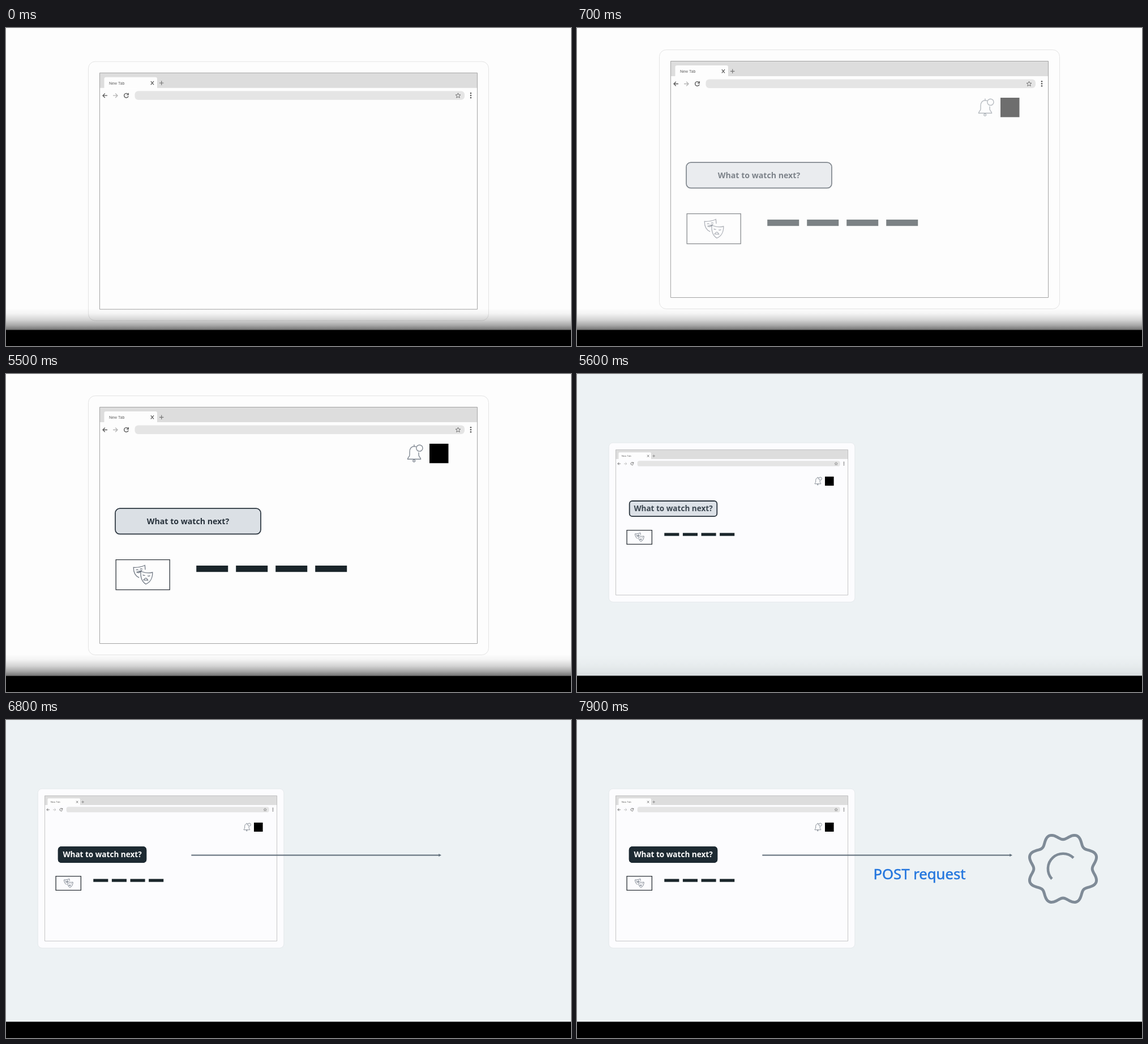
Animation of 998 by 561 pixels, one loop 8000 ms. Source, as an HTML page with a canvas:

```html
<!DOCTYPE html>
<html lang="en">
<head>
<meta charset="utf-8">
<title>Request flow</title>
<style>
  html, body { margin: 0; width: 100%; height: 100%; overflow: hidden; background: #000; }
  canvas { display: block; }
</style>
</head>
<body>
<canvas id="stage" width="998" height="561"></canvas>
<script>
const ctx = document.getElementById('stage').getContext('2d');
const LOOP = 8000, STEP = 100;
const SANS = '"Noto Sans", "Open Sans", sans-serif';
let now = 0;

// Fade progress: starts faintly at `start` and is complete 400 ms later.
const fade = start => now < start ? 0 : Math.min(1, 0.13 + 0.87 * (now - start) / 400);

function rect(x, y, w, h, fill) {
  ctx.fillStyle = fill;
  ctx.fillRect(x, y, w, h);
}

function box(x, y, w, h, r, fill, stroke, lw = 1) {
  ctx.beginPath();
  ctx.roundRect(x, y, w, h, r);
  if (fill) { ctx.fillStyle = fill; ctx.fill(); }
  if (stroke) { ctx.strokeStyle = stroke; ctx.lineWidth = lw; ctx.stroke(); }
}

function line(d, color, lw) {
  ctx.strokeStyle = color;
  ctx.lineWidth = lw;
  ctx.stroke(new Path2D(d));
}

function dot(x, y, r, color) {
  ctx.beginPath();
  ctx.arc(x, y, r, 0, 7);
  ctx.fillStyle = color;
  ctx.fill();
}

function text(str, x, y, font, color, align) {
  ctx.font = font;
  ctx.textAlign = align;
  ctx.fillStyle = color;
  ctx.fillText(str, x, y);
}

function group(x, y, scale, alpha, draw) {
  ctx.save();
  ctx.translate(x, y);
  ctx.scale(scale, scale);
  ctx.globalAlpha *= alpha;
  draw();
  ctx.restore();
}

function star(x, y, r) {
  ctx.beginPath();
  for (let i = 0; i < 10; i++) {
    const a = i * Math.PI / 5, d = i % 2 ? r * 0.45 : r;
    ctx.lineTo(x + d * Math.sin(a), y - d * Math.cos(a));
  }
  ctx.closePath();
  ctx.strokeStyle = '#707070';
  ctx.lineWidth = 1;
  ctx.stroke();
}

function browser(edge, page) {
  box(145.5, 38.5, 707, 457, 12, page, edge);
  rect(165.5, 58.5, 667, 26.5, '#dddddd');
  box(173.5, 66, 93.5, 19.5, [3, 3, 0, 0], '#fdfdfd');
  text('New Tab', 182, 79, '7.1px Roboto, sans-serif', '#666', 'left');
  line('M255.8 73.2l5.2 6.2m0-6.2l-5.2 6.2', '#555', 1.2);
  line('M271 76.3h7.4m-3.7-3.7v7.4', '#777', 1.2);
  line('M179 98.5h-8m3.8-3.8l-3.8 3.8l3.8 3.8', '#5c5c5c', 1.3);
  line('M189 98.5h8m-3.8-3.8l3.8 3.8l-3.8 3.8', '#b4b4b4', 1.3);
  line('M215.2 95.8A3.8 3.8 0 1 0 216.1 99.5M216.3 94v3.2h-3.2', '#5c5c5c', 1.4);
  box(227.5, 90.5, 582.5, 15.5, 6, '#e5e5e5');
  star(798.5, 98.7, 4.6);
  for (const y of [94.3, 98.3, 102.3]) dot(821, y, 1.3, '#555');
  box(165.5, 58.5, 667, 417, 0, null, '#a4a4a4');
}

function account(lw) {
  const c = '#808892';
  line('M720.9 124.5v3M724.6 128.4C715.5 125.6 713 132.5 713 137.5V142.5' +
    'C713 147 709.5 146.5 709.5 150.3H732.5C732.5 146.5 729 147 729 142.5V138.2', c, lw);
  line('M736 130.8a5.6 5.6 0 1 1-11.2 0a5.6 5.6 0 1 1 11.2 0z', c, lw);
  line('M722.6 153.2a1.9 1.9 0 1 1-3.8 0a1.9 1.9 0 1 1 3.8 0z', c, lw);
  rect(748, 123, 33.5, 34.3, '#000');
}

function shelf(lw, maskLw) {
  const c = '#717984';
  box(194.2, 327.7, 95, 53, 0, null, '#30363c', lw);
  line('M246 345.3L245.3 337.5C239 340.3 231 341.6 225.2 341.2C225.2 350 228.6 356.6 235.2 359.4', c, maskLw);
  line('M229.6 346q2.2-1.7 4 0M236.6 344.6q2.2-1.8 4.2-.4M231 349.6q4 3 8.5-2.8z', c, maskLw);
  line('M238 348C244.5 350.8 252 351.6 258.8 350C259 359.5 255 367.5 247 370.6' +
    'C240 366.5 237.4 357.5 238 348z', c, maskLw);
  line('M241.6 354.2q1.8 2 4 .8M250.2 356q2 1.4 4.2-.4M243.2 363.4q3.6-6.6 7.4.4z', c, maskLw);
  for (let i = 0; i < 4; i++) rect(336.2 + i * 70, 338, 56, 11.2, '#1a252a');
}

function button(x, y, w, h, r, lw, size, fill, edge, color) {
  box(x, y, w, h, r, fill, edge, lw);
  text('What to watch next?', x + w / 2, y + h / 2 + size * 0.36,
    `700 ${size}px ${SANS}`, color, 'center');
}

function shade(strength) {
  const g = ctx.createLinearGradient(0, 494, 0, 532);
  [[0, 0], [0.25, 0.07], [0.55, 0.3], [0.8, 0.63], [1, 1]]
    .forEach(([p, a]) => g.addColorStop(p, `rgba(0,0,0,${a * strength})`));
  rect(0, 494, 998, 38, g);
}

function pageScene() {
  rect(0, 0, 998, 561, '#fdfdfd');
  group(0, now < 500 ? 20.7 : 0, 1, 1, () => browser('#e4e4e4', '#fdfdfd'));
  group(0, 0, 1, fade(500), () => {
    account(1.4);
    button(193, 237.2, 257, 45.2, 8, 1.7, 14.15, '#dbe0e5', '#2a343e', '#28323c');
    shelf(1.3, 1.3);
  });
  shade(0.53);
}

function arrow(progress) {
  ctx.save();
  ctx.beginPath();
  ctx.rect(326, 234, 443 * progress, 9);
  ctx.clip();
  line('M327.3 238.5H766', '#5f6d79', 1.9);
  ctx.fillStyle = '#5f6d79';
  ctx.fill(new Path2D('M764.3 236L769 238.5L764.3 241z'));
  ctx.restore();
}

function gear() {
  ctx.beginPath();
  for (let i = 0; i < 240; i++) {
    const a = i * Math.PI / 120;
    const r = 57.4 - 5.7 * Math.cos(8 * a);
    ctx.lineTo(r * Math.cos(a), r * Math.sin(a));
  }
  ctx.closePath();
  ctx.strokeStyle = '#616f7f';
  ctx.lineWidth = 5;
  ctx.stroke();
  ctx.beginPath();
  ctx.arc(0, 0, 26.6, 2.4, 5.48);
  ctx.lineWidth = 4.6;
  ctx.stroke();
}

function requestScene() {
  rect(0, 0, 998, 561, '#edf2f4');
  group(-33.2, 97.7, 0.6147, 1, () => browser('#dbe1e4', '#fcfcfe'));
  group(89.4, 123.7, 0.466, 1, () => account(2));
  group(-2.4, 122.9, 0.466, 1, () => shelf(2.9, 1.9));

  const place = [92.7, 224, 154.6, 27.2, 5, 1.8, 13.55];
  button(...place, '#dce1e7', '#29333c', '#3b4650');
  group(0, 0, 1, fade(5800), () => button(...place, '#1d2a32', '#1d2a32', '#fff'));

  arrow(fade(6400));
  group(0, 0, 1, fade(7000), () => {
    const font = `400 25.7px ${SANS}`;
    text('POST request', 605, 281, font, '#2376de', 'center');
    ctx.strokeStyle = '#2376de';
    ctx.lineWidth = 0.5;
    ctx.strokeText('POST request', 605, 281);
  });
  group(858.5, 262.4, 1, fade(7600), gear);
  if (now < 5700) shade(0.09);
}

function frame() {
  now = Math.floor(performance.now() % LOOP / STEP) * STEP;
  ctx.lineCap = 'butt';
  ctx.lineJoin = 'miter';
  if (now < 5600) pageScene();
  else requestScene();
  rect(0, 532.3, 998, 29, '#000');
  requestAnimationFrame(frame);
}
requestAnimationFrame(frame);
</script>
</body>
</html>
```
